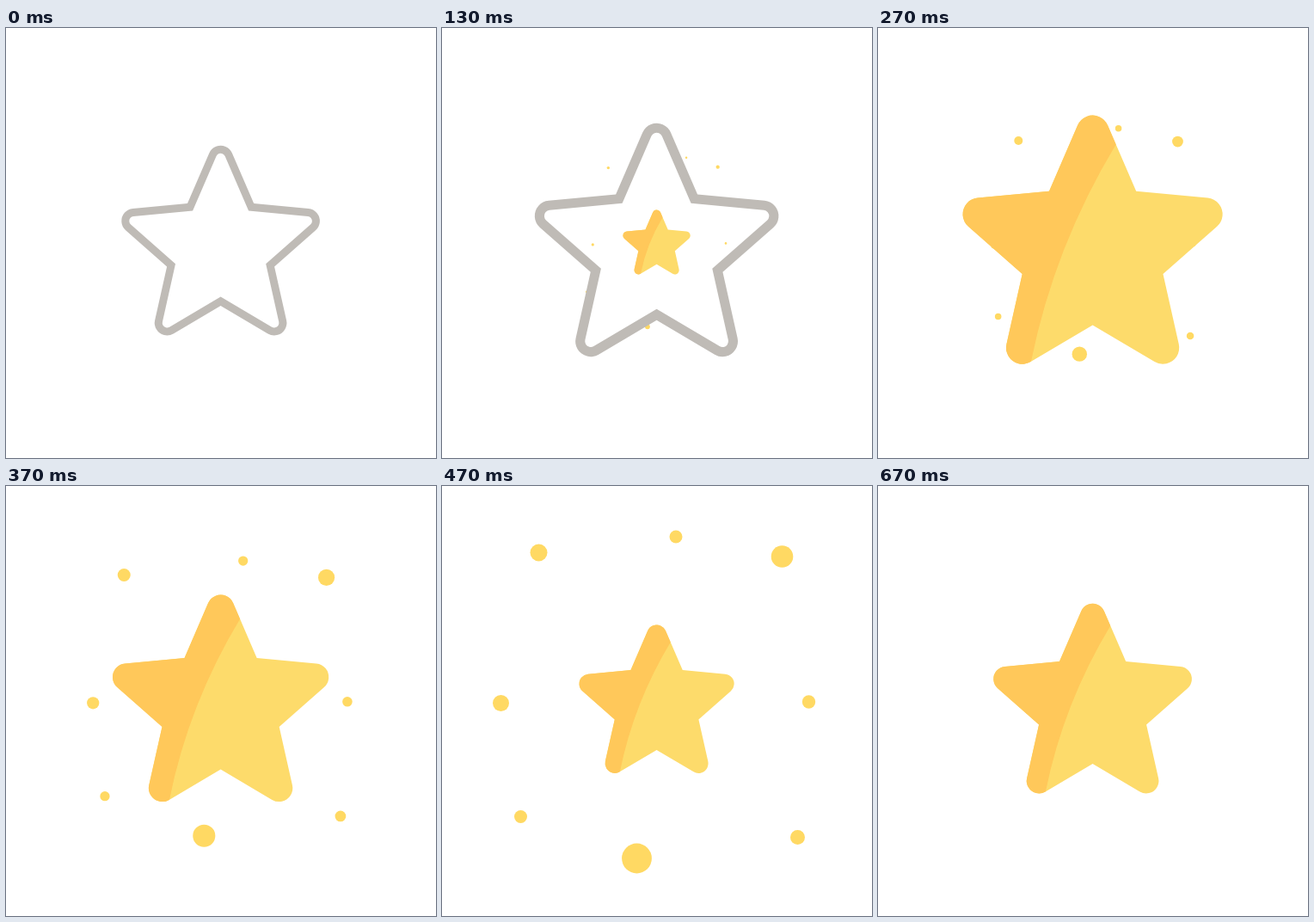
Write an HTML page with a canvas that moves like this. It is 500 px wide and 500 px high and loops after 1.66 s.

```html
<!DOCTYPE html>
<html lang="en">
<head>
<meta charset="utf-8">
<title>Star pop</title>
<style>
  html, body { margin: 0; width: 100%; height: 100%; overflow: hidden; background: #fff; }
  canvas { display: block; width: 100vw; height: 100vh; }
</style>
</head>
<body>
<canvas id="stage" width="500" height="500"></canvas>
<script>
const ctx = document.getElementById('stage').getContext('2d');
const LOOP = 1660, TICK = 100 / 3, LAST = 20;
const GREY = '#bfbbb6', LIGHT = '#fddb6b', DARK = '#ffc85a', DOT = '#ffd963';
const PEAK = 1.31, DIP = 0.75;

// near x, near y, far x, far y, full radius
const dots = [
  [179.5, 148, 112.5, 77.5, 10],
  [282, 135, 272, 59, 7.5],
  [333.5, 148, 395.5, 82, 12.8],
  [157, 252, 68.5, 252.5, 9.5],
  [346.5, 250.5, 426.5, 251, 7.7],
  [155, 320, 91.5, 384.5, 7.5],
  [347, 342, 413.5, 408.5, 8.5],
  [236.8, 362, 226.5, 433, 17.4]
];

const clamp = v => Math.min(1, Math.max(0, v));
const ease = (n, from, to) => {
  const s = clamp((n - from) / (to - from));
  return s * s * (3 - 2 * s);
};
const mix = (a, b, k) => a + (b - a) * k;

// Regular star with round tips and sharp notches
function starPath(tipR, notchR) {
  const path = new Path2D(), reach = 106, cy = 7.2, step = Math.PI / 5;
  const dx = notchR * Math.cos(step) - reach, dy = notchR * Math.sin(step);
  const sweep = Math.atan2(dy, dx) - Math.acos(tipR / Math.hypot(dx, dy));
  for (let i = 0; i < 5; i++) {
    const a = -Math.PI / 2 + i * 2 * step, b = a + step;
    path.arc(reach * Math.cos(a), cy + reach * Math.sin(a), tipR, a - sweep, a + sweep);
    path.lineTo(notchR * Math.cos(b), cy + notchR * Math.sin(b));
  }
  path.closePath();
  return path;
}

const star = starPath(14.5, 65.7);
const ring = new Path2D(star);
ring.addPath(starPath(5.5, 55.3));
const shade = new Path2D('M31 -105L21 -88Q-34 3 -54.6 105L-57 117H-140V-140H31Z');

function scaled(size, paint) {
  ctx.save();
  ctx.translate(249.6, 250);
  ctx.scale(size, size);
  paint();
  ctx.restore();
}

function drawDots(n) {
  const size = n < 14 ? clamp((n - 2) / 12) : clamp((18 - n) / 4);
  if (!size) return;
  const near = ease(6, -1, 21), far = ease(14, -1, 21);
  const k = (ease(n, -1, 21) - near) / (far - near);
  ctx.fillStyle = DOT;
  for (const [x0, y0, x1, y1, r] of dots) {
    ctx.beginPath();
    ctx.arc(mix(x0, x1, k), mix(y0, y1, k), r * size, 0, Math.PI * 2);
    ctx.fill();
  }
}

function starSize(n) {
  if (n <= 8) return PEAK * ease(n, 2, 8);
  if (n <= 15) return mix(PEAK, DIP, ease(n, 8, 15));
  return mix(DIP, 1, ease(n, 15, LAST));
}

function draw(ms) {
  const n = Math.min(LAST, Math.floor((ms % LOOP + 3.4) / TICK));
  ctx.fillStyle = '#fff';
  ctx.fillRect(0, 0, 500, 500);
  drawDots(n);
  if (n < 8) {
    scaled(mix(1, PEAK, ease(n, 0, 6)), () => {
      ctx.fillStyle = GREY;
      ctx.fill(ring, 'evenodd');
    });
  }
  const size = starSize(n);
  if (size > 0) {
    scaled(size, () => {
      ctx.fillStyle = LIGHT;
      ctx.fill(star);
      ctx.clip(star);
      ctx.fillStyle = DARK;
      ctx.fill(shade);
    });
  }
}

const start = performance.now();
function loop() {
  draw(performance.now() - start);
  requestAnimationFrame(loop);
}
loop();
</script>
</body>
</html>
```
